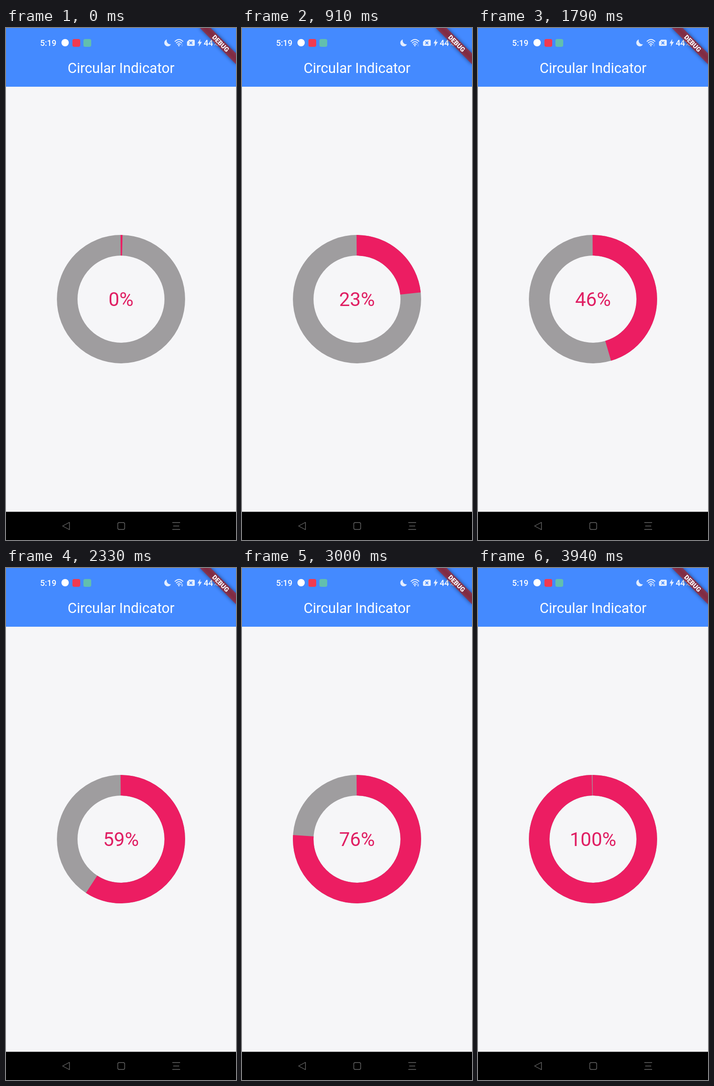
These frames come from a looping animation (502x1116 px, 3.97 s). An HTML page:

```html
<!DOCTYPE html>
<html lang="en">
<head>
<meta charset="utf-8">
<title>Circular Indicator</title>
<style>
  html, body { margin: 0; width: 100%; height: 100%; overflow: hidden; background: #f6f6f8; }
  svg { display: block; width: 100%; height: 100%; font-family: Roboto, sans-serif; }
  .status { font-size: 18px; font-weight: 500; fill: #fff; }
  .title { font-size: 30.7px; fill: #fff; text-anchor: middle; }
  .label { font-size: 42px; fill: #e01f63; text-anchor: middle; }
  .debug { font-size: 14.2px; font-weight: 900; fill: #fff; text-anchor: middle; }
  .ring { fill: none; stroke-width: 45; }
  .nav { fill: none; stroke: #686868; stroke-width: 1.4; stroke-linejoin: round; }
  .wifi { fill: none; stroke: #e4eeff; stroke-width: 2; stroke-linecap: round; }
</style>
</head>
<body>
<svg viewBox="0 0 502 1116" preserveAspectRatio="none">
  <defs>
    <filter id="soft" x="-30%" y="-150%" width="160%" height="400%">
      <feGaussianBlur stdDeviation="4"/>
    </filter>
  </defs>

  <rect width="502" height="1116" fill="#f6f6f8"/>
  <rect width="502" height="128" fill="#448aff"/>

  <!-- status bar -->
  <text class="status" x="74.5" y="39">5:19</text>
  <circle cx="129" cy="32" r="8" fill="#fff"/>
  <rect x="145" y="24" width="17" height="17" rx="4" fill="#f23a50"/>
  <rect x="169" y="24" width="17" height="17" rx="4" fill="#62bfae"/>
  <g fill="#e4eeff">
    <path d="M351 25A7.6 7.6 0 1 0 360 35.5A8.2 8.2 0 0 1 351 25Z"/>
    <path d="M399.5 25.5H409.5Q412 25.5 412 28V36.5Q412 39 409.5 39H397.5Q395 39 395 36.5V30Z"/>
    <path d="M424 24L418 33.5H421.6L420.8 40.5L427.5 30.3H423.4Z"/>
  </g>
  <path d="M400.5 29.5L406.5 35.5M406.5 29.5L400.5 35.5" stroke="#448aff" stroke-width="1.8"/>
  <path class="wifi" d="M369 29Q377.5 21 386 29M371.8 32.5Q377.5 27 383.2 32.5M374.6 35.7Q377.5 33 380.4 35.7"/>
  <circle cx="377.3" cy="38.3" r="1.6" fill="#e4eeff"/>
  <path id="traffic" d="M382.2 36.6L384.3 34.2L386.4 36.6ZM382.2 37.8H386.4L384.3 40.2Z" fill="#e4eeff"/>
  <text class="status" x="431.5" y="39">44%</text>
  <text class="title" x="251" y="98.3">Circular Indicator</text>

  <!-- corner ribbon -->
  <g transform="translate(502 0) rotate(45)">
    <rect x="-55.8" y="39" width="111.6" height="16.8" opacity=".5" filter="url(#soft)"/>
    <rect x="-55.8" y="39" width="111.6" height="16.8" fill="#b71c1c" fill-opacity=".627"/>
    <text class="debug" x="0" y="52.4">DEBUG</text>
  </g>

  <!-- indicator -->
  <circle class="ring" cx="251" cy="591" r="117.4" stroke="#9f9d9f"/>
  <circle class="ring" id="arc" cx="251" cy="591" r="117.4" stroke="#ec1d62"
          pathLength="100" stroke-dasharray="0 200" transform="rotate(-90.4 251 591)"/>
  <text class="label" id="label" x="251" y="606">0%</text>

  <!-- navigation bar -->
  <rect y="1054.5" width="502" height="61.5"/>
  <path class="nav" d="M123.5 1085.5L138.5 1077.5V1093.5Z"/>
  <rect class="nav" x="244" y="1078" width="15" height="15" rx="3"/>
  <path class="nav" d="M363 1078H380M365 1085.5H378M363 1093H380"/>
</svg>

<script>
  const LOOP = 3970;
  const STEP = 1000 / 33;
  const arc = document.getElementById('arc');
  const label = document.getElementById('label');
  const traffic = document.getElementById('traffic');
  const stepStart = k => Math.round(k * STEP / 10) * 10;

  function stepAt(t) {
    const k = Math.floor(t / STEP) + 1;
    return stepStart(k) > t ? k - 1 : k;
  }

  function draw(now) {
    const t = now % LOOP;
    const percent = Math.min(100, 0.498 + 0.02521 * STEP * stepAt(t));
    arc.setAttribute('stroke-dasharray', percent.toFixed(3) + ' 200');
    label.textContent = Math.round(percent) + '%';
    traffic.setAttribute('opacity', t < 2100 ? 0.35 : 1);
  }

  let start;
  function tick(now) {
    start ??= now;
    draw(now - start);
    requestAnimationFrame(tick);
  }
  draw(0);
  requestAnimationFrame(tick);
</script>
</body>
</html>
```
